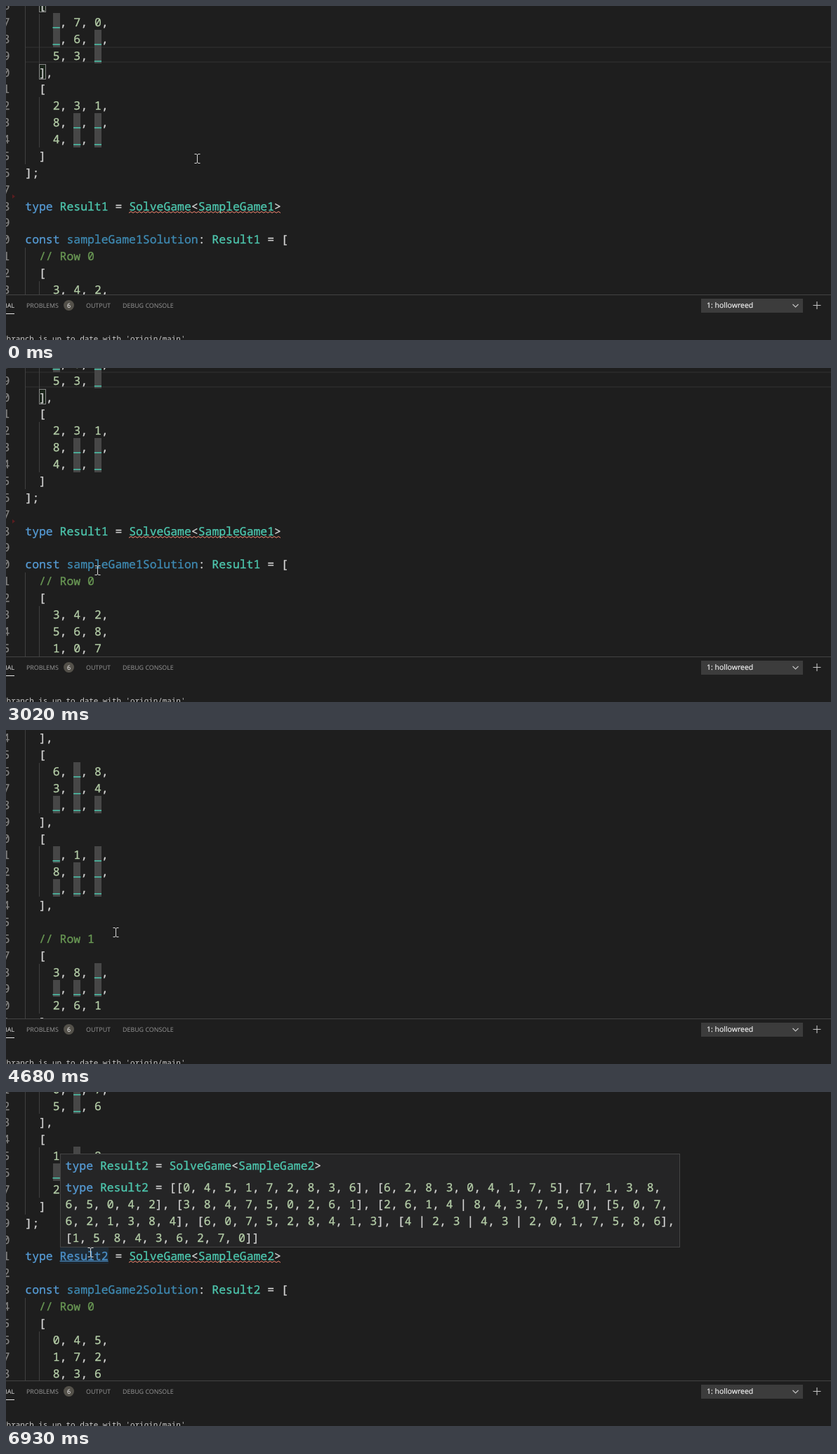
An HTML page for the animation above (8000 ms loop, 1175 px wide and 477 px high).

```html
<!DOCTYPE html>
<html lang="en">
<head>
<meta charset="utf-8">
<title>Type solver demo</title>
<style>
html, body { margin: 0; width: 100%; height: 100%; overflow: hidden; background: #1e1e1e; }
#stage { position: relative; width: 1175px; height: 477px; overflow: hidden; background: #1e1e1e; }
#stage * { position: absolute; box-sizing: border-box; }
#stage span, #stage .ln { position: static; }

/* editor */
#editor { left: 0; top: 0; width: 1175px; height: 412px; overflow: hidden; }
#doc {
  left: 0; top: 273px; width: 1175px; height: 0;
  font: 16.43px/23.875px "Noto Sans Mono", monospace;
  text-rendering: geometricPrecision; font-variant-ligatures: none;
  -webkit-text-stroke: .3px;
  white-space: pre; color: #d4d4d4;
  animation: scroll 8s step-end infinite;
}
#code { left: 27.3px; top: -286px; }
#nums { left: -4.6px; top: -286px; color: #858585; }
.ln { height: 23.875px; }
.d1, .d2 { background: linear-gradient(#404040 0 0) 0 0 / 1px 100% no-repeat; }
.d2 { background: linear-gradient(#404040 0 0) 0 0 / 1px 100% no-repeat,
                  linear-gradient(#404040 0 0) 19.7px 0 / 1px 100% no-repeat; }
.key { color: #569cd6; }
.type { color: #4ec9b0; }
.num { color: #b5cea8; }
.note { color: #6a9955; }
.faded { color: #3f8bb4; }
.gap { color: #4ec9b0; background: #474747; padding: .8px 0; }
.row { left: 27px; top: -215px; width: 1148px; height: 23px; border: solid #282828; border-width: 2px 0; }
.pair { left: 47px; width: 10px; height: 22px; border: 1px solid #888; background: rgba(0, 100, 0, .1); }
.mark { left: 9px; top: -4px; border: solid transparent; border-width: 3px 0 3px 4px; border-left-color: #5a1c1f; }
.wave { left: 175px; overflow: visible; fill: none; stroke: #f48771; stroke-width: 1; }

.hot1 .key + .type { animation: hot1 8s step-end infinite; }
.hot2 .key + .type { animation: hot2 8s step-end infinite; }

.head, .body { left: 77px; width: 883px; border: 1px solid #454545; background: #252526; padding-left: 6.6px; }
.head { top: -134px; height: 33px; padding-top: 4.5px; border-bottom: 0; }
.body { top: -102px; height: 102px; padding-top: 3.5px; }
.body { animation: body1 8s step-end infinite; }
.head { animation: head1 8s step-end infinite; }
#tip2 .body { animation-name: body2; }
#tip2 .head { animation-name: head2; }

/* panel */
#panel {
  left: 0; top: 412px; width: 1175px; height: 65px; border-top: 1px solid #434343; overflow: hidden;
  background: #1e1e1e; color: #989898; font: 8.9px/14px "Open Sans", sans-serif;
  text-rendering: geometricPrecision; white-space: pre;
}
#panel .tab { top: 8px; }
#panel .on { right: 1163px; color: #e7e7e7; }
#panel .bar { left: 0; top: 26px; width: 12px; height: 1px; background: #e7e7e7; }
#panel .badge { left: 82px; top: 7px; width: 15px; height: 15px; border-radius: 50%; background: #54514a;
  color: #fff; line-height: 15px; text-align: center; }
#panel .pick { left: 990px; top: 5px; width: 145px; height: 20px; background: #3c3c3c; color: #f0f0f0;
  padding-left: 8px; font-size: 10.5px; line-height: 21px; -webkit-text-stroke: .2px; }
#panel svg { left: 0; top: 0; fill: none; stroke: #c5c5c5; stroke-width: 1.1; }
#panel .out { left: .6px; top: 55px; color: #ccc; font: 10.9px/15px "Noto Sans Mono", monospace; }

/* pointer */
#ptr { left: 0; top: 0; width: 1px; height: 1px; overflow: visible; animation: move 8s step-end infinite; }
#beam { fill: none; stroke: #d8d8d8; stroke-width: 1; animation: beam 8s step-end infinite; }
#hand { fill: #fff; stroke: #111; stroke-width: .8; animation: hand 8s step-end infinite; }

@keyframes scroll {
  0% { transform: translateY(0); }
  37.75% { transform: translateY(-53px); }
  38.875% { transform: translateY(-159px); }
  40% { transform: translateY(-264px); }
  41.125% { transform: translateY(-370px); }
  42.5% { transform: translateY(-476px); }
  44.625% { transform: translateY(-529px); }
  45.625% { transform: translateY(-634px); }
  46.625% { transform: translateY(-740px); }
  47.625% { transform: translateY(-846px); }
  48.5% { transform: translateY(-899px); }
  49.5% { transform: translateY(-1005px); }
  50.5% { transform: translateY(-1110px); }
  51.375% { transform: translateY(-1216px); }
  52.5% { transform: translateY(-1322px); }
  53.625% { transform: translateY(-1427px); }
  56.75% { transform: translateY(-1586px); }
  57.625% { transform: translateY(-1745px); }
  58.5% { transform: translateY(-1850px); }
  59.5% { transform: translateY(-1956px); }
  60.5% { transform: translateY(-2009px); }
  61.5% { transform: translateY(-2115px); }
  62.5% { transform: translateY(-2168px); }
  63.5% { transform: translateY(-2273px); }
  64.5% { transform: translateY(-2379px); }
  65.5% { transform: translateY(-2432px); }
  67.375% { transform: translateY(-2644px); }
  70.25% { transform: translateY(-2696px); }
  72.25%, 100% { transform: translateY(-2749px); }
}
@keyframes move {
  0% { transform: translate(272px, 218px); }
  .75% { transform: translate(264px, 212px); }
  1.75% { transform: translate(243px, 209px); }
  2.75% { transform: translate(213px, 215px); }
  3.625% { transform: translate(180px, 229px); }
  4.625% { transform: translate(147px, 247px); }
  5.625% { transform: translate(119px, 263px); }
  6.5% { transform: translate(100px, 273px); }
  7.5% { transform: translate(93px, 277px); }
  8.5% { transform: translate(97px, 277px); }
  11.5% { transform: translate(104px, 289px); }
  37.75% { transform: translate(130px, 289px); }
  38.875% { transform: translate(160px, 289px); }
  40% { transform: translate(175px, 289px); }
  42.5% { transform: translate(180px, 289px); }
  46.625% { transform: translate(172px, 289px); }
  50.5% { transform: translate(160px, 289px); }
  56.75% { transform: translate(156px, 289px); }
  73.25% { transform: translate(150px, 280px); }
  74.25% { transform: translate(140px, 264px); }
  75.125% { transform: translate(130px, 248px); }
  76% { transform: translate(123px, 235px); }
  77%, 100% { transform: translate(120px, 229px); }
}
@keyframes hot1 {
  0%, 37.75%, 100% { color: #4ec9b0; background: transparent; text-decoration: none; }
  11.5% { color: #4ec9b0; background: rgba(38, 79, 120, .28); text-decoration: none; }
  16.125% { color: #4e94ce; background: rgba(38, 79, 120, .28); text-decoration: underline; }
}
@keyframes hot2 {
  0% { color: #4ec9b0; background: transparent; text-decoration: none; }
  81% { color: #4ec9b0; background: rgba(38, 79, 120, .28); text-decoration: none; }
  82.75%, 100% { color: #4e94ce; background: rgba(38, 79, 120, .28); text-decoration: underline; }
}
@keyframes body1 { 0%, 37.75%, 100% { opacity: 0; } 11.5% { opacity: .6; } 12.25% { opacity: 1; } }
@keyframes head1 { 0%, 37.75%, 100% { opacity: 0; } 20.375% { opacity: 1; } }
@keyframes body2 { 0% { opacity: 0; } 81% { opacity: .5; } 81.875% { opacity: .85; } 82.75%, 100% { opacity: 1; } }
@keyframes head2 { 0% { opacity: 0; } 86.625%, 100% { opacity: 1; } }
@keyframes beam { 0%, 37.75%, 100% { opacity: 1; } 18.25% { opacity: 0; } }
@keyframes hand { 0%, 37.75%, 100% { opacity: 0; } 18.25% { opacity: 1; } }
</style>
</head>
<body>
<div id="stage">
  <div id="editor">
    <div id="doc">
      <div class="row"></div>
      <div class="pair" style="top:-286px"></div>
      <div class="pair" style="top:-190px"></div>
      <div class="mark"></div>
      <div id="nums"></div>
      <div id="code"></div>
    </div>
  </div>
  <div id="panel">
    <div class="tab on">TERMINAL</div>
    <div class="bar"></div>
    <div class="tab" style="left:29px">PROBLEMS</div>
    <div class="badge">6</div>
    <div class="tab" style="left:114px">OUTPUT</div>
    <div class="tab" style="left:166px">DEBUG CONSOLE</div>
    <div class="pick">1: hollowreed</div>
    <svg width="1175" height="65"><path d="M1120.5 13l4 4 4-4M1149.5 14.5h11M1155 9v11"/></svg>
    <div class="out">branch is up to date with 'origin/main'.</div>
  </div>
  <svg id="ptr">
    <path id="beam" d="M-3.5 -6.5H-1L.5 -5.5 2 -6.5H4.5M.5 -5.5V5.5M-3.5 6.5H-1L.5 5.5 2 6.5H4.5"/>
    <path id="hand" d="M-3.5 -9.5q1.5 0 1.5 1.5V-2.5l5 1q3.5.8 3.5 3V4.5L5 8.5H-2L-7 1.5q-.5-2 2-1V-8q0-1.5 1.5-1.5z"/>
  </svg>
</div>
<script>
const LINE = 23.875, FIRST = -12;
const $ = id => document.getElementById(id);

// Nine cells become a bracketed 3x3 block; a tenth character keeps the final comma.
function block(cells, last) {
  const rows = [0, 3, 6].map(i => '    ' + [...cells.slice(i, i + 3)].join(', '));
  return ['  [', rows[0] + ',', rows[1] + ',', rows[2] + (cells[9] || ''), last ? '  ]' : '  ],'];
}

function game(text) {
  const blocks = text.split(' ');
  return blocks.flatMap((b, i) => [
    ...(i % 3 ? [] : [...(i ? ['  '] : []), `  // Row ${i / 3}`]),
    ...block(b, i === 8)
  ]);
}

const kinds = [
  ['note', /^\/\//], ['key', /^(type|const)$/], ['faded', /^s/],
  ['type', /^[A-Z]/], ['gap', /^_/], ['num', /^\d/]
];
function paint(text) {
  return text.replace(/\/\/.*|\b(?:type|const)\b|sampleGame\dSolution|[A-Z]\w+|_|\d|</g, word => {
    if (word === '<') return '&lt;';
    const [kind] = kinds.find(([, rule]) => rule.test(word));
    return `<span class="${kind}">${word}</span>`;
  });
}

const resultLine = n => `type Result${n} = SolveGame<SampleGame${n}>`;
const solutionLine = n => `const sampleGame${n}Solution: Result${n} = [`;

const lines = [
  ...block('_70_6_53_'), ...block('2318__4__', true), '];', '',
  resultLine(1), '', solutionLine(1),
  ...game('342568107 687013254 510724386 026851473 345726801 178043652 685734210, 470162538 231805467'),
  '];', '', '', '', '', '', '',
  'type SampleGame2 = [',
  ...game('0___7_8__ 6_83_4___ _1_8_____ 38____261 ___4_3_5_ 507____84 _____8_1_ ___0_75_6 1_8_3_2_0'),
  '];', '',
  resultLine(2), '', solutionLine(2),
  '  // Row 0', ...block('045172836')
];

$('code').innerHTML = lines.map(text => {
  const depth = text.match(/^ */)[0].length / 2;
  const hot = text.startsWith('type Result') ? ' hot' + text[11] : '';
  return `<div class="ln d${depth}${hot}">${paint(text)}</div>`;
}).join('');
$('nums').innerHTML = lines.map((_, i) => `<div class="ln">${(i + FIRST + 18) % 10}</div>`).join('');

function addHover(n, result) {
  const top = (lines.indexOf(resultLine(n)) + FIRST) * LINE;
  const zigzag = Array.from({ length: 73 }, (_, i) => `${i * 3},${i % 2 ? .5 : 2.5}`).join(' ');
  $('doc').insertAdjacentHTML('beforeend', `
    <svg class="wave" style="top:${top + 19.5}px" width="216" height="3"><polyline points="${zigzag}"/></svg>
    <div id="tip${n}" style="top:${top}px;left:0"><div class="body">${paint(`type Result${n} = ` + result)}</div><div class="head">${paint(resultLine(n))}</div></div>`);
}

addHover(1, `[[3, 4, 2, 5, 6, 8, 1, 0, 7], [6, 8, 7, 0, 1, 3, 2, 5, 4], [5, 1, 0, 7,
2, 4, 3, 8, 6], [0, 2, 6, 8, 5, 1, 4, 7, 3], [3, 4, 5, 7, 2, 6, 8, 0, 1], [1, 7, 8, 0,
4, 3, 6, 5, 2], [6, 8, 5, 7, 3, 4, 2, 1, 0], [4, 7, 0, 1, 6, 2, 5, 3, 8], [2, 3, 1, 8,
0, 5, 4, 6, 7]]`);
addHover(2, `[[0, 4, 5, 1, 7, 2, 8, 3, 6], [6, 2, 8, 3, 0, 4, 1, 7, 5], [7, 1, 3, 8,
6, 5, 0, 4, 2], [3, 8, 4, 7, 5, 0, 2, 6, 1], [2, 6, 1, 4 | 8, 4, 3, 7, 5, 0], [5, 0, 7,
6, 2, 1, 3, 8, 4], [6, 0, 7, 5, 2, 8, 4, 1, 3], [4 | 2, 3 | 4, 3 | 2, 0, 1, 7, 5, 8, 6],
[1, 5, 8, 4, 3, 6, 2, 7, 0]]`);
</script>
</body>
</html>
```
